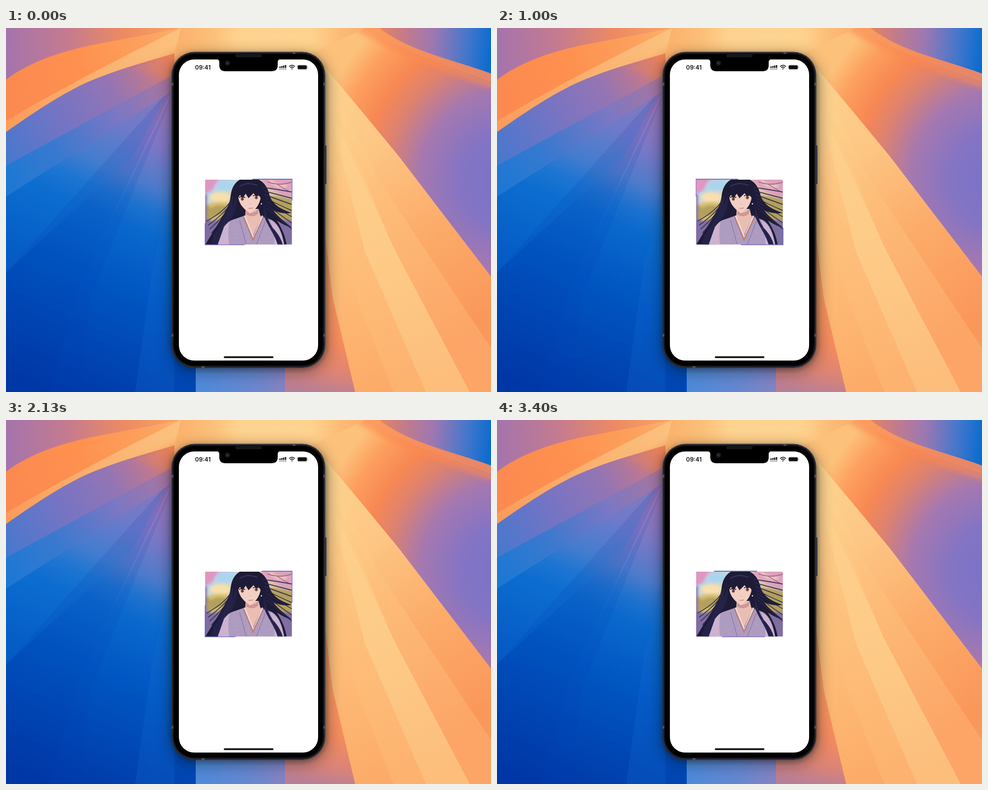
An HTML page that plays this animation: 864x648 px, repeating every 3.43 s.

```html
<!DOCTYPE html>
<html lang="en">
<head>
<meta charset="utf-8">
<title>Rotating border card</title>
<style>
html, body { margin: 0; width: 100%; height: 100%; overflow: hidden; background: #0a6cd0; }
svg { display: block; width: 864px; height: 648px; }
.time { font: 600 10.4px Inter, sans-serif; fill: #111; }
</style>
</head>
<body>
<svg viewBox="0 0 864 648" xmlns="http://www.w3.org/2000/svg">
<defs id="defs">
  <filter id="soft" x="-30%" y="-30%" width="160%" height="160%"><feGaussianBlur stdDeviation="14"/></filter>
  <filter id="haze" x="-30%" y="-30%" width="160%" height="160%"><feGaussianBlur stdDeviation="5"/></filter>
  <filter id="fuzz"><feGaussianBlur stdDeviation="2"/></filter>
  <clipPath id="card"><rect x="354" y="268.6" width="156.2" height="117.8"/></clipPath>
  <clipPath id="art"><rect x="354.8" y="270" width="154.4" height="115.3"/></clipPath>
  <clipPath id="upperRight"><path d="M545 45L640 0C690 34 770 62 864 97V443L700 229L640 156L570 72Z"/></clipPath>
  <radialGradient id="dusk" gradientUnits="userSpaceOnUse" cx="900" cy="270" r="360">
    <stop offset="0" stop-color="#7672c8"/><stop offset=".25" stop-color="#8474c4"/>
    <stop offset=".45" stop-color="#a578b0"/><stop offset=".62" stop-color="#dd826f"/>
    <stop offset=".74" stop-color="#f88853"/><stop offset=".88" stop-color="#fd9f5e"/>
    <stop offset="1" stop-color="#fcc27b"/>
  </radialGradient>
</defs>

<!-- wallpaper, left -->
<rect width="500" height="648" fill="url(#deep)"/>
<path d="M0 300L300 95L225 230L0 435Z" fill="#1a80dc" opacity=".2"/>
<path d="M0 435L300 100L130 460L75 648H0Z" fill="#0030a0" opacity=".12"/>
<path d="M75 648L130 460L300 110L150 480L132 648Z" fill="#003cb0" opacity=".12"/>
<path d="M230 648L262 420L300 250V648Z" fill="#1a74d4" opacity=".2"/>
<path d="M0 245L300 70V110L0 300Z" fill="url(#beamB)"/>
<path d="M0 185C60 143 110 110 160 90S250 60 300 45V82L0 245Z" fill="url(#beamA)"/>
<path d="M0 0H330L200 30L0 100Z" fill="url(#mauve)"/>
<path d="M0 92C40 62 90 44 150 31C220 17 270 9 312 0H400L300 45C250 60 210 70 160 90S60 143 0 185Z" fill="url(#flame)"/>
<path d="M0 185V166C90 112 190 60 312 0H380L300 45C250 60 210 70 160 90S60 143 0 185Z" fill="url(#stripe)"/>
<path d="M225 72L310 35V100Z" fill="#f5864c" opacity=".25" filter="url(#haze)"/>
<rect x="338" y="560" width="160" height="88" fill="url(#foot)"/>

<!-- wallpaper, right -->
<path d="M312 0H864V648H497V300H300V45Z" fill="url(#peach)"/>
<ellipse cx="480" cy="15" rx="90" ry="26" fill="#fed795" opacity=".8" filter="url(#soft)"/>
<path d="M545 45L640 0C690 34 770 62 864 97V443L700 229L640 156L570 72Z" fill="url(#dusk)"/>
<g clip-path="url(#upperRight)">
  <path d="M630 -6C690 34 770 62 870 98" fill="none" stroke="#fb8850" stroke-width="22" opacity=".6" filter="url(#haze)"/>
</g>
<path d="M640 0C690 34 770 62 864 97V0Z" fill="url(#corner)"/>
<path d="M640 0C690 34 770 62 864 97V81C790 54 720 42 665 0Z" fill="url(#rim)"/>
<path d="M568 70L640 156L700 229L864 443V648H497V300Z" fill="url(#sand)"/>
<path d="M568 70L640 156L700 229L864 443V570L660 265Z" fill="url(#wedge)"/>
<path d="M575 110L660 265L864 570V648H826L690 390Z" fill="url(#shade)"/>
<path d="M572 130L690 390L826 648H748L640 400Z" fill="url(#light)"/>
<path d="M569 240L640 400L748 648H690L620 470Z" fill="#fdbd7c" opacity=".4"/>
<path d="M497 300H560L582 480L622 648H497Z" fill="url(#ember)"/>

<!-- phone -->
<rect x="295" y="50" width="275" height="560" rx="42" fill="#10131c" opacity=".5" filter="url(#soft)"/>
<rect x="294" y="46" width="276" height="561" rx="42" fill="#10131c" opacity=".4" filter="url(#haze)"/>
<rect x="568" y="209" width="3" height="69" rx="1" fill="#3c3d47"/>
<rect x="295" y="42.6" width="273.6" height="562.4" rx="41" fill="#15161c"/>
<rect x="296" y="43.6" width="271.6" height="560.4" rx="40" fill="none" stroke="#3f4149" stroke-width="1"/>
<rect x="299" y="46.5" width="265.6" height="554.5" rx="37" fill="#000"/>
<path d="M295 100h3M565.5 100h3M295 547h3M565.5 547h3M351 602v3M513 42.8v3" stroke="#50525c" stroke-width="5"/>
<rect x="308" y="56" width="248" height="536" rx="27" fill="#fff"/>
<path d="M375 55.5H489Q484 56 484 61V66Q484 77 473 77H391Q380 77 380 66V61Q380 56 375 55.5Z" fill="#000"/>
<rect x="409" y="47.5" width="46" height="4" rx="2" fill="#151619" stroke="#2a2b31" stroke-width=".6"/>
<circle cx="394.5" cy="62.5" r="4.6" fill="#171a22"/>
<circle cx="394.5" cy="62.5" r="2" fill="#283346"/>
<text class="time" x="336.8" y="73.8">09:41</text>
<g id="signal" fill="#111"></g>
<g fill="none" stroke="#111" stroke-width="1.5">
  <path d="M504.4 68.6Q509.5 64 514.6 68.6M506.4 70.8Q509.5 68 512.6 70.8"/>
  <path d="M508 72.3Q509.5 71 511 72.3L509.5 74Z" fill="#111" stroke="none"/>
</g>
<rect x="519.5" y="66.2" width="16.5" height="7.4" rx="2" fill="#111" stroke="#999" stroke-width=".7"/>
<rect x="536.8" y="68.6" width="1" height="2.6" fill="#999"/>
<rect x="388" y="584.6" width="88.5" height="3" rx="1.5" fill="#050505"/>

<!-- card: turning bar behind the picture -->
<g clip-path="url(#card)">
  <rect id="bar" x="394" y="207.5" width="76" height="240" fill="url(#glow)"/>
</g>
<g clip-path="url(#art)">
  <rect x="354" y="269" width="156" height="117" fill="url(#sky)"/>
  <g filter="url(#fuzz)">
    <ellipse cx="381" cy="301" rx="18" ry="9" fill="#f8dfae"/>
    <ellipse cx="392" cy="281" rx="16" ry="8" fill="#a9d6ee"/>
    <path d="M350 320Q372 305 400 312L410 360H350ZM458 302Q485 296 512 308V360H460Z" fill="#b3a05c"/>
    <path d="M362 318Q380 308 398 316" stroke="#d8c070" stroke-width="6" fill="none"/>
    <path d="M350 265H382Q372 276 368 288Q358 296 350 294Z" fill="#dd97c2"/>
    <path d="M452 265H512V300Q492 302 480 290Q462 288 452 265Z" fill="#dca0bd"/>
    <path d="M470 272Q488 286 500 280" stroke="#f0cfc0" stroke-width="5" fill="none"/>
    <path d="M350 345Q372 335 390 348V390H350ZM484 345Q500 338 512 346V390H484Z" fill="#7f6ea0"/>
    <path d="M355 296V388" stroke="#7f66ac" stroke-width="5"/>
    <path d="M365 342Q382 333 396 336" stroke="#d8c46c" stroke-width="5" fill="none"/>
  </g>
  <path d="M466 274Q488 282 510 274M484 279L503 290" stroke="#a0607e" stroke-width="1.4" fill="none"/>
  <path d="M432 266C412 267 402 280 400 300C398 320 382 340 355 386H380C391 372 405 356 420 348H460C475 358 488 376 491 386H500C497 366 488 352 483 343C494 350 502 354 509 355C494 343 482 334 476 324C488 330 498 331 509 329C492 324 477 316 470 300C466 278 453 266 432 266Z" fill="#1d1b36"/>
  <g id="strands" fill="none" stroke="#2b2850" stroke-width="1.4"></g>
  <path d="M376 388C381 364 388 348 402 342L428 333H450L474 342C487 350 492 366 496 388Z" fill="#ae9bc0"/>
  <path d="M376 388Q382 358 398 344Q394 368 398 388ZM470 342Q489 350 496 388H478Q480 362 470 342Z" fill="#cdb2d0"/>
  <path d="M427 322L426 338L439 370L454 338L450 322Z" fill="#eabfb2"/>
  <path d="M425 334L441 374L457 334" fill="none" stroke="#eadbe4" stroke-width="2.4"/>
  <path d="M423 336L440 377L459 336" fill="none" stroke="#bd7c66" stroke-width="2.2"/>
  <path d="M416 342L428 386M462 344L446 386" stroke="#8672a2" stroke-width="1" fill="none"/>
  <path d="M428 323Q437 335 450 322L449 331Q438 339 428 332Z" fill="#cf9795"/>
  <path d="M413 293C413 311 421 321 435 330C447 322 454 311 455 292L448 283H420Z" fill="#f3cfc3"/>
  <path d="M410 308C406 292 412 281 424 275C438 271 453 280 457 292Q460 302 456 312Q455 303 450 297L446 301L441 294L432 303L427 295L421 304L417 297Q414 301 410 308Z" fill="#1d1b36"/>
  <path d="M415 302Q420 298 426 302M440 299Q446 296 452 299" stroke="#2a2030" stroke-width="1.6" fill="none"/>
  <ellipse cx="421" cy="304.5" rx="2.6" ry="2.8" fill="#684444"/>
  <ellipse cx="446" cy="302" rx="2.6" ry="2.8" fill="#684444"/>
  <path d="M432 321Q436 322 440 320" stroke="#b96b70" stroke-width="1" fill="none"/>
  <path d="M434 312L435.5 314" stroke="#d49c92" stroke-width=".8"/>
  <circle cx="455" cy="313" r="1.2" fill="#f4e6ee"/>
  <path d="M458 292C460 326 467 347 479 360Q490 373 493 386H484C480 370 466 352 460 336ZM411 300C412 326 402 341 389 352L377 386H364C370 367 386 346 400 326Z" fill="#25224a"/>
  <path d="M416 282Q430 273 448 280" stroke="#48457a" stroke-width="1.5" fill="none" opacity=".7"/>
  <g id="petals" fill="#e6d2e4"></g>
</g>
</svg>
<script>
const NS = 'http://www.w3.org/2000/svg';
const $ = id => document.getElementById(id);

function add(parent, tag, attrs) {
  const el = document.createElementNS(NS, tag);
  for (const k in attrs) el.setAttribute(k, attrs[k]);
  parent.appendChild(el);
  return el;
}

// stops: "offset colour, offset colour, ..."
function gradient(id, line, stops) {
  const [x1, y1, x2, y2] = line.split(' ');
  const g = add($('defs'), 'linearGradient', { id, x1, y1, x2, y2, gradientUnits: 'userSpaceOnUse' });
  for (const s of stops.split(',')) {
    const [offset, color] = s.trim().split(' ');
    add(g, 'stop', { offset, 'stop-color': color });
  }
}

gradient('deep', '290 110 60 640', '0 #a577b4, .17 #7f78c5, .29 #4e7bcb, .36 #1f72ce, .43 #0a68cc, .62 #0056c2, 1 #0038a6');
gradient('beamA', '0 230 300 60', '0 #4878ce, .35 #7574c3, .65 #9475b4, .85 #bd7890, 1 #ec8258');
gradient('beamB', '0 280 300 80', '0 #1c78d4, .3 #3979cf, .65 #7b77c4, 1 #b27698');
gradient('mauve', '0 20 320 0', '0 #a474ac, .35 #c67b8e, .65 #ec8a62, 1 #fba765');
gradient('flame', '0 120 350 20', '0 #fb8950, .4 #ff914f, .75 #fca25f, 1 #fdbd78');
gradient('stripe', '0 175 340 20', '0 #fb9b5b, .35 #fbab69, .7 #fab977, 1 #fdc480');
gradient('foot', '338 0 497 0', '0 #4d8ada, .6 #6687d0, 1 #8583c2');
gradient('peach', '312 0 660 40', '0 #fbb36c, .3 #fdcb85, .65 #fdcb84, 1 #fba865');
gradient('corner', '660 10 864 30', '0 #e5865f, .25 #c27b8b, .5 #9c78b2, .78 #4777ca, 1 #0b6ccf');
gradient('rim', '650 0 864 90', '0 #fc9d5f, .5 #f68c5a, 1 #e3866c');
gradient('sand', '575 150 760 648', '0 #fdd08b, .4 #fdc17c, .75 #fdb36f, 1 #fca765');
gradient('wedge', '580 90 864 500', '0 #fdd38f, .3 #fdc583, .65 #fcab69, 1 #fa985a');
gradient('shade', '600 160 790 560', '0 #fdd08b, .4 #fdbc78, 1 #fca567');
gradient('light', '590 180 770 620', '0 #fdd08b, .5 #fdcb87, 1 #fdbe7c');
gradient('ember', '580 440 540 648', '0 #fb9c5e, .55 #f58c5e, .8 #dd8474, 1 #b77e98');
gradient('sky', '354 269 420 386', '0 #d9b0d4, .2 #b9d6e8, .45 #f3d8a4, 1 #a28e9a');
gradient('glow', '0 265 0 390', '0 #4f5dcb, 1 #7458c8');

for (let i = 0; i < 4; i++) {
  const x = 487 + i * 3.3, h = 2.4 + i * 0.9;
  add($('signal'), 'rect', { x, y: 71 - h, width: 2.3, height: h, rx: 0.5 });
  add($('signal'), 'rect', { x, y: 72.3, width: 2.3, height: 1.3, opacity: 0.75 });
}
for (let i = 0; i < 7; i++) {
  add($('strands'), 'path', {
    d: `M${458 + i} ${284 + i * 6}Q${476 + i * 2} ${286 + i * 9} 509 ${292 + i * 11}`
  });
  add($('strands'), 'path', {
    d: `M${405 - i / 2} ${300 + i * 5}Q${394 - i} ${324 + i * 4} ${357 + i * 3} ${344 + i * 7}`
  });
}
for (let i = 0; i < 26; i++) {
  add($('petals'), 'circle', { cx: 388 + (i * 41) % 102, cy: 354 + (i * 17) % 31, r: 0.6, opacity: 0.7 });
}

const LOOP = 3430, SPEED = 0.09, START = 47;
const t0 = performance.now();

function draw(now) {
  const t = Math.max(0, now - t0) % LOOP;
  $('bar').setAttribute('transform', `rotate(${START + t * SPEED} 432 327.5)`);
  requestAnimationFrame(draw);
}
draw(t0);
</script>
</body>
</html>
```
